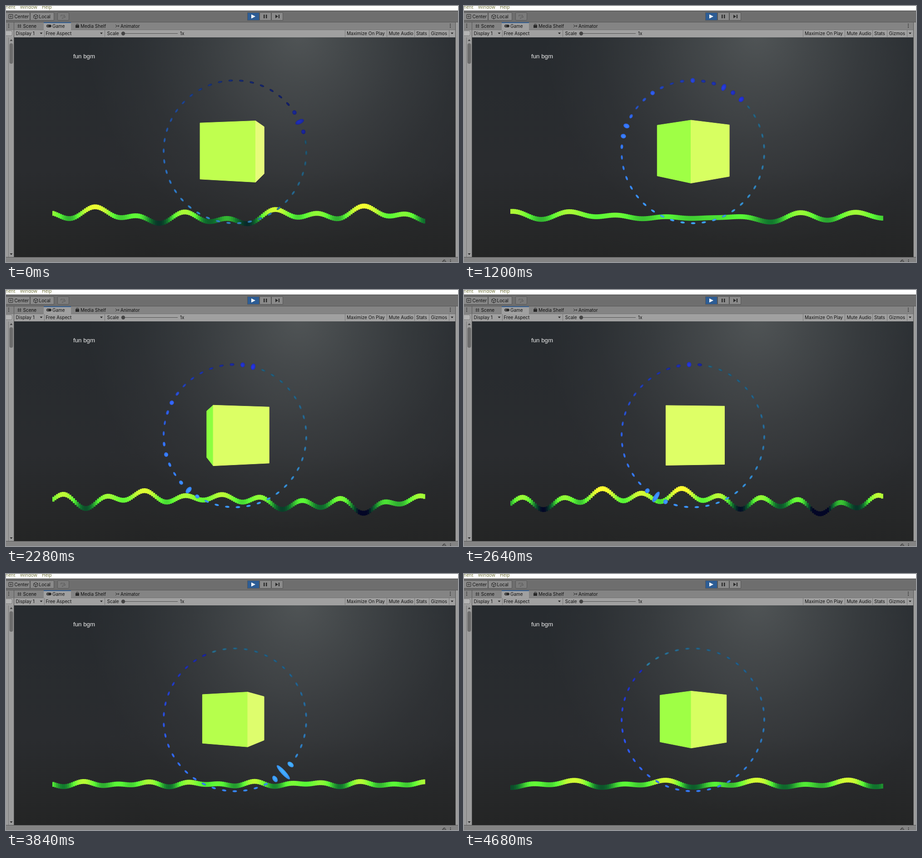
These frames come from a looping animation (995 px wide and 563 px high, 4.8 s). An HTML page with a canvas:

```html
<!DOCTYPE html>
<html lang="en">
<head>
<meta charset="utf-8">
<title>Ring and wave</title>
<style>
html, body { margin: 0; width: 100%; height: 100%; overflow: hidden; background: #222; }
canvas, svg { position: absolute; left: 0; top: 0; width: 995px; height: 563px; display: block; }
text { font: 10px Inter, Roboto, sans-serif; fill: #101010; }
.menu { font: 10px "Open Sans", sans-serif; fill: #6b6d32; }
.label { font: 13.3px "Liberation Sans", Arial, sans-serif; fill: #ececec; }
</style>
</head>
<body>
<canvas id="view" width="995" height="563"></canvas>
<svg viewBox="0 0 995 563">
  <defs>
    <g id="more" fill="#222"><circle cy="-3.5" r=".9"/><circle r=".9"/><circle cy="3.5" r=".9"/></g>
    <path id="down" d="M-3-1.5h6l-3 3.5z" fill="#262626"/>
  </defs>
  <path d="M0 0H995V10H0z" fill="#fff"/>
  <text class="menu" x="-1" y="6">nent</text>
  <text class="menu" x="31" y="6">Window</text>
  <text class="menu" x="79" y="6">Help</text>
  <path d="M0 10.5H995V36H0z" fill="#6e6e6e"/>
  <path d="M0 36H995V52H0z" fill="#848484"/>
  <path d="M0 52H990V69H0z" fill="#a0a0a0"/>
  <path d="M0 69H17V552H0z" fill="#9c9c9c"/>
  <path d="M0 552H995V563H0z" fill="#848484"/>
  <path d="M990 36H995V552H990z" fill="#9c9c9c"/>
  <path d="M0 35.5H995M17.5 36V552M989.5 36V552M0 552.5H995" stroke="#555" fill="none"/>
  <path d="M0 52.5H83M143 52.5H989" stroke="#757575"/>

  <g stroke="#555" fill="#8a8a8a">
    <path d="M-2 14.5H52.5V31.5H-2zM53.5 14.5H105.5V31.5H53.5z"/>
    <rect x="113.5" y="14.5" width="25" height="17" rx="2" fill="#7b7b7b"/>
    <path d="M558.5 14.5H583.5V31.5H558.5zM584.5 14.5H609.5V31.5H584.5z"/>
    <path d="M531.5 14.5H557.5V31.5H531.5z" fill="#2d5d95"/>
  </g>
  <path d="M540 18.5L549 23L540 27.5z" fill="#fff"/>
  <path d="M567 19h2.5v8h-2.5zM572 19h2.5v8h-2.5zM593 19l6 4l-6 4zM600 19h2v8h-2z" fill="#2b2b2b"/>
  <g fill="none" stroke="#222">
    <rect x="6" y="18.5" width="9" height="9" rx="1"/>
    <circle cx="10.5" cy="23" r="1.5"/>
    <path d="M61 21l4.5-2.5l4.5 2.5v5l-4.5 2.5l-4.5-2.5zM61 21l4.5 2.5l4.5-2.5M65.5 23.5v5"/>
    <path d="M121 20h8v7M121 20v4M123 27h3M126 22v5M129 24h3" stroke="#4a4a4a" stroke-dasharray="2 1"/>
  </g>
  <text x="18.5" y="27">Center</text>
  <text x="72.5" y="27">Local</text>

  <path d="M83 36H143V53H83z" fill="#a0a0a0"/>
  <path d="M83 36.7H143" stroke="#2c5f9c" stroke-width="1.8"/>
  <path d="M27.5 40v8M31.5 40v8M25 42.5h9M25 46h9" stroke="#333" fill="none"/>
  <rect x="89" y="41" width="11" height="6" rx="3" fill="#292929"/>
  <path d="M92 42.5v3M90.5 44h3" stroke="#aaa" stroke-width=".8"/>
  <path d="M153 42h8v6h-8z" fill="#292929"/>
  <path d="M155 42v-2h4v2M241 41l3 3l-3 3M244 44h5M247 42l2 2l-2 2" stroke="#292929" fill="none"/>
  <text x="37.5" y="47.5">Scene</text>
  <text x="102" y="47.5">Game</text>
  <text x="164" y="47.5">Media Shelf</text>
  <text x="252" y="47.5">Animator</text>
  <use href="#more" x="6" y="43.5"/>
  <use href="#more" x="978" y="43.5"/>

  <rect x="-6" y="54.5" width="19.5" height="11" rx="3" fill="#b4b4b4" stroke="#777"/>
  <path d="M84.5 53V68M217.5 53V68M746.5 53V68M838.5 53V68M899.5 53V68M931.5 53V68M975.5 53V68" stroke="#777"/>
  <text x="21.5" y="64">Display 1</text>
  <use href="#down" x="77.5" y="60"/>
  <text x="87.5" y="64">Free Aspect</text>
  <use href="#down" x="210" y="60"/>
  <text x="222.5" y="64">Scale</text>
  <path d="M258 60.5H378" stroke="#505050"/>
  <circle cx="258" cy="60.5" r="4.2" fill="#444"/>
  <text x="383" y="64">1x</text>
  <text x="750" y="64">Maximize On Play</text>
  <text x="842.5" y="64">Mute Audio</text>
  <text x="903" y="64">Stats</text>
  <text x="935.5" y="64">Gizmos</text>
  <use href="#down" x="982" y="60"/>

  <path d="M5.5 69V552" stroke="#777"/>
  <rect x="7.5" y="82" width="8" height="45" rx="4" fill="#6c6c6c"/>
  <path d="M8.5 77l3-4l3 4z" fill="#444"/>
  <use href="#down" x="11.5" y="545.5"/>
  <path d="M961 561h7v3h-7zM963 561v-2q2-2 4 0" fill="none" stroke="#2a2a2a"/>
  <use href="#more" x="978.5" y="562"/>
  <text class="label" x="148" y="115">fun bgm</text>
</svg>
<script>
const ctx = document.getElementById("view").getContext("2d");
const STEP = 120, STEPS = 40, SPIN = -25.85, DOTS = 42, CUBES = 200;
const rad = d => d * Math.PI / 180;
const mix = (a, b, u) => a + (b - a) * u;
const rgb = c => `rgb(${c.map(v => Math.round(Math.min(255, v)))})`;

// Piecewise blend through [position, r, g, b] stops.
function ramp(stops, v) {
  const n = stops.findIndex(s => s[0] >= v);
  if (n === 0) return stops[0].slice(1);
  if (n < 0) return stops[stops.length - 1].slice(1);
  const a = stops[n - 1], b = stops[n], u = (v - a[0]) / (b[0] - a[0]);
  return [1, 2, 3].map(k => mix(a[k], b[k], u));
}

const faceColors = [[-65, 140, 255, 64], [-15, 194, 255, 79], [5, 222, 255, 102], [55, 213, 255, 95], [76, 234, 250, 128]];
const waveColors = [[-1.2, 255, 255, 48], [-.55, 190, 252, 54], [0, 90, 250, 54], [.5, 18, 122, 46], [1, 3, 6, 38]];
const dotColors = [[0, 62, 166, 216], [16, 62, 165, 255], [41, 40, 56, 240]];

// The music at a few moments: tones are [amplitude, wavelength, crest x],
// beats are [dot, extra length], range is the height over which the wave darkens.
const moments = [
  { t: 0, size: .189, light: .76, base: 462, range: 20, beats: [[40, 16]],
    tones: [[7, 650, 115], [8, 197, 798], [8, 98.5, 783]] },
  { t: 720, size: .191, light: 1, base: 462, range: 18, beats: [[39, 21], [36, 12], [28, 14]],
    tones: [[5.5, 128.5, 350], [2.5, 258, 274]] },
  { t: 1800, size: .186, light: 1, base: 464, range: 32, beats: [[41, 20], [32, 12], [27, 11]],
    tones: [[6, 900, 130], [5, 154, 264], [4, 104, 742]] },
  { t: 2640, size: .189, light: 1, base: 463, range: 20, beats: [[23, 22], [40, 7]],
    tones: [[12, 760, 400], [11, 86.9, 302], [7, 200, 295]] },
  { t: 3360, size: .18, light: 1, base: 463, range: 20, beats: [[25, 4], [33, 4]],
    tones: [[10, 210, 620], [8, 97.5, 546]] },
  { t: 3840, size: .17, light: 1, base: 462, range: 11, beats: [[18, 37]],
    tones: [[3, 76, 774], [3, 122, 298]] },
  { t: 4680, size: .174, light: 1, base: 462, range: 11, beats: [],
    tones: [[5, 204, 632], [4, 100, 845]] }
];
const swing = (m, x) => m.tones.reduce((y, [amp, len, crest]) => y - amp * Math.cos(2 * Math.PI * (x - crest) / len), 0);
const swell = (m, i) => m.beats.reduce((s, [dot, len]) => s + len * Math.exp(-1.2 * (i - dot) ** 2), 0);

function glow(x, y, r, color, alpha) {
  const g = ctx.createRadialGradient(x, y, 0, x, y, r);
  for (let k = 0; k <= 4; k++) g.addColorStop(k / 4, `rgba(${color},${alpha * (1 - k / 4) ** 1.5})`);
  ctx.fillStyle = g;
  ctx.fillRect(18, 69, 971, 483);
}

function drawBackdrop() {
  const g = ctx.createLinearGradient(0, 69, 0, 552);
  g.addColorStop(0, "#272b2f");
  g.addColorStop(.6, "#2a2c2f");
  g.addColorStop(1, "#242525");
  ctx.fillStyle = g;
  ctx.fillRect(18, 69, 971, 483);
  glow(645, 60, 470, "150,155,152", .36);
  glow(600, 250, 420, "110,116,120", .08);
}

function drawCube(angle, size) {
  const corner = a => {
    const s = 1 / (1 - size * Math.cos(rad(a)));
    const half = 421 * size * Math.SQRT1_2 * s, mid = 308 + 10 * s;
    return [504 + 421 * size * Math.sin(rad(a)) * s, mid - half, mid + half];
  };
  for (let n = -1; n < 3; n++) {
    const a = angle + n * 90, l = corner(a), r = corner(a + 90);
    if (r[0] <= l[0]) continue;
    const facing = (a + 45 + 540) % 360 - 180;
    ctx.fillStyle = ctx.strokeStyle = rgb(ramp(faceColors, facing));
    ctx.beginPath();
    ctx.moveTo(l[0], l[1]);
    ctx.lineTo(r[0], r[1]);
    ctx.lineTo(r[0], r[2]);
    ctx.lineTo(l[0], l[2]);
    ctx.closePath();
    ctx.fill();
    ctx.stroke();
  }
}

function drawWave(a, b, u) {
  const base = mix(a.base, b.base, u), range = mix(a.range, b.range, u);
  const fade = Math.cos(u * Math.PI / 2), rise = Math.sin(u * Math.PI / 2);
  for (let n = 0; n < CUBES; n++) {
    const x = 102 + n * 816 / (CUBES - 1);
    const dy = fade * swing(a, x) + rise * swing(b, x);
    ctx.fillStyle = rgb(ramp(waveColors, dy / range));
    ctx.fillRect(x, base + dy - 5.3, 4.8, 10.6);
  }
}

function drawDot(i, seam, extra, light) {
  const a = rad(seam + 4.28 + i * 360 / DOTS);
  const lit = light * (.78 - .12 * Math.cos(a) + .2 * Math.sin(a)) * Math.min(1.6, 1 + extra * .07);
  const color = ramp(dotColors, i).map(v => v * Math.min(lit, 1.05));
  const g = ctx.createRadialGradient(-.2, -.2, 0, 0, 0, 1);
  g.addColorStop(0, rgb(color.map(v => v * 1.1)));
  g.addColorStop(.6, rgb(color));
  g.addColorStop(1, rgb(color.map(v => v * .85)));
  ctx.save();
  ctx.translate(504 + 157 * Math.cos(a), 320.7 + 157 * Math.sin(a));
  ctx.rotate(a);
  ctx.scale(2.2 + extra / 2, 5);
  ctx.fillStyle = g;
  ctx.beginPath();
  ctx.arc(0, 0, 1, 0, 7);
  ctx.fill();
  ctx.restore();
}

function draw(step) {
  const t = step * STEP;
  let k = 0;
  while (k < moments.length - 2 && t >= moments[k + 1].t) k++;
  const a = moments[k], b = moments[k + 1], u = (t - a.t) / (b.t - a.t);
  const turn = SPIN * t / 1000;
  drawBackdrop();
  drawCube(28.4 + turn, mix(a.size, b.size, u));
  drawWave(a, b, u);
  for (let i = 0; i < DOTS; i++)
    drawDot(i, turn - 12, mix(swell(a, i), swell(b, i), u), mix(a.light, b.light, u));
}

let shown = -1;
const start = performance.now();
function tick() {
  const step = Math.floor(Math.max(0, performance.now() - start) / STEP) % STEPS;
  if (step !== shown) draw(shown = step);
  requestAnimationFrame(tick);
}
tick();
</script>
</body>
</html>
```
